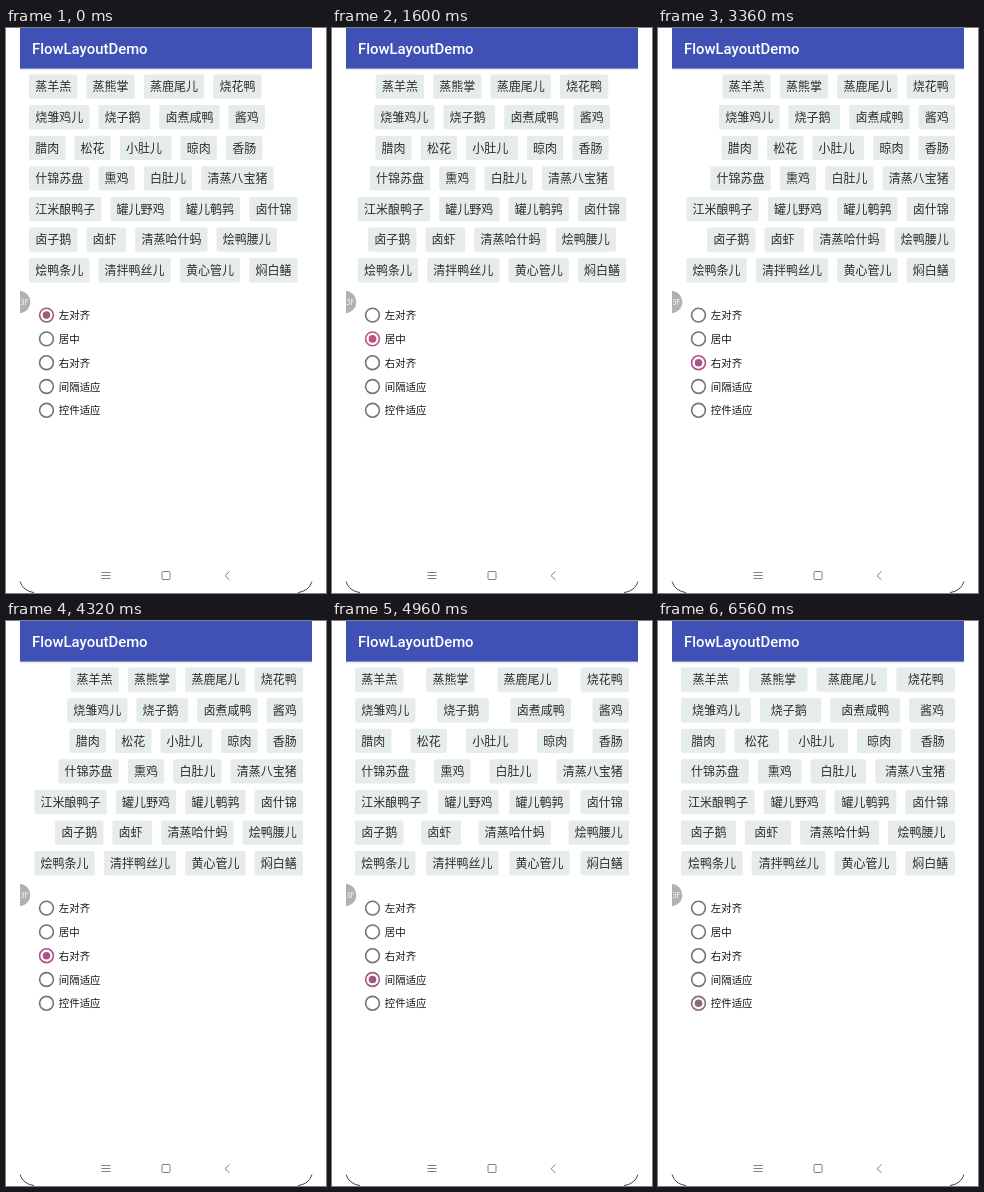
An HTML page for the animation above (7.04 s loop, 320x565 px).

```html
<!DOCTYPE html>
<html lang="zh-CN">
<head>
<meta charset="utf-8">
<title>FlowLayoutDemo</title>
<style>
  html, body { margin: 0; width: 100%; height: 100%; overflow: hidden; background: #fff; }
  svg { display: block; width: 100vw; height: 100vh; }
  text { font-family: "Noto Sans CJK SC", "Noto Sans CJK", sans-serif; white-space: pre; }
  .title { font: 500 14.9px Roboto, sans-serif; fill: #fff; }
  .chip rect { fill: #e6ecec; }
  .chip text { font-size: 12px; fill: #2a2d2d; }
  .option text { font-size: 10.45px; fill: #151515; }
  .ring { stroke-width: 1.6; }
  .nav { fill: none; stroke: #808080; stroke-width: 1; }
</style>
</head>
<body>
<svg id="stage" viewBox="0 0 320 565" preserveAspectRatio="none">
  <defs>
    <linearGradient id="shade" x2="0" y2="1">
      <stop offset="0" stop-color="#000" stop-opacity=".14"/>
      <stop offset="1" stop-color="#000" stop-opacity="0"/>
    </linearGradient>
    <clipPath id="screen"><rect x="14" width="292" height="565"/></clipPath>
  </defs>
  <rect width="320" height="565" fill="#fff"/>
  <rect x="14" y="40" width="292" height="3" fill="url(#shade)"/>
  <rect x="14" width="292" height="40.6" fill="#3f51b5"/>
  <text class="title" x="26" y="25.7">FlowLayoutDemo</text>
  <g id="chips"></g>
  <g id="options"></g>
  <g clip-path="url(#screen)">
    <circle cx="13" cy="274" r="11.3" fill="#b2b0b0"/>
    <text x="14.5" y="276.8" font-size="7" fill="#fff">3F</text>
  </g>
  <g class="nav">
    <path d="M95.5 544.5h9M95.5 547.5h9M95.5 550.5h9"/>
    <rect x="156" y="543.5" width="8" height="8" rx="1"/>
    <path d="M223.5 543.5l-4.5 4.2l4.5 4.2"/>
  </g>
  <path d="M14 553.500Q17 563 28 564.600M306 553.500Q303 563 292 564.600" fill="none" stroke="#333" stroke-width=".9"/>
</svg>
<script>
const LOOP = 7040;
const LEFT = 23, RIGHT = 297, GAP = 9;
const TOP = 46.5, PITCH = 30.6, HEIGHT = 24.3;
const GREY = '#747474', PRESSED = '#ececec';

const MENU = [
  '蒸羊羔|蒸熊掌|蒸鹿尾儿|烧花鸭',
  '烧雏鸡儿|烧子鹅 |卤煮咸鸭|酱鸡',
  '腊肉|松花|小肚儿 |晾肉|香肠',
  '什锦苏盘|熏鸡|白肚儿|清蒸八宝猪',
  '江米酿鸭子|罐儿野鸡|罐儿鹌鹑|卤什锦',
  '卤子鹅|卤虾 |清蒸哈什蚂|烩鸭腰儿',
  '烩鸭条儿|清拌鸭丝儿|黄心管儿|焖白鳝'
];
const OPTIONS = ['左对齐', '居中', '右对齐', '间隔适应', '控件适应'];
const ACCENTS = ['#9a5f76', '#c05080', '#b05088', '#a0587e', '#8a6b76'];

// time, selected option, size of its dot, size of the previous dot
const STEPS = [
  [0, 0, 1, 0],
  [1120, 1, 0, 1], [1280, 1, .5, .45], [1440, 1, 1, 0],
  [2880, 2, 0, 1], [3040, 2, .5, .45], [3200, 2, 1, 0],
  [4480, 3, 0, 1], [4640, 3, .5, .45], [4800, 3, 1, 0],
  [6080, 4, 0, 1], [6240, 4, .4, .5], [6400, 4, .8, .15], [6560, 4, 1, 0]
];

function add(parent, tag, attrs = {}, text = '') {
  const el = document.createElementNS('http://www.w3.org/2000/svg', tag);
  set(el, attrs);
  el.textContent = text;
  return parent.appendChild(el);
}

function set(el, attrs) {
  for (const key in attrs) el.setAttribute(key, attrs[key]);
}

const byId = id => document.getElementById(id);

const rows = MENU.map((line, r) => line.split('|').map(label => {
  const name = label.trim();
  const textWidth = name.length * 12 + (label === name ? 0 : 3.4);
  const y = TOP + r * PITCH;
  const g = add(byId('chips'), 'g', { class: 'chip' });
  return {
    textWidth,
    width: textWidth + 12.4,
    box: add(g, 'rect', { y, height: HEIGHT, rx: 1.8 }),
    text: add(g, 'text', { y: y + HEIGHT / 2 + 4.7 }, name)
  };
}));

const radios = OPTIONS.map((label, i) => {
  const cy = 287.1 + i * 23.8;
  const g = add(byId('options'), 'g', { class: 'option' });
  const ring = add(g, 'circle', { class: 'ring', cx: 40.5, cy, r: 6.9 });
  const dot = add(g, 'circle', { cx: 40.5, cy });
  add(g, 'text', { x: 52.8, y: cy + 4 }, label);
  return { ring, dot };
});

function layout(mode) {
  for (const row of rows) {
    const used = row.reduce((sum, chip) => sum + chip.width, GAP * (row.length - 1));
    const spare = RIGHT - LEFT - used;
    const gap = GAP + (mode === 3 ? spare / (row.length - 1) : 0);
    const grow = mode === 4 ? spare / row.length : 0;
    let x = LEFT + [0, spare / 2, spare, 0, 0][mode];
    for (const chip of row) {
      const width = chip.width + grow;
      set(chip.box, { x, width });
      set(chip.text, { x: x + (width - chip.textWidth) / 2 });
      x += width + gap;
    }
  }
}

function show([, selected, size, oldSize]) {
  layout(selected);
  radios.forEach(({ ring, dot }, i) => {
    const active = i === selected;
    const color = active ? ACCENTS[i] : GREY;
    const scale = active ? size : i === selected - 1 ? oldSize : 0;
    set(ring, { stroke: color, fill: active && !size ? PRESSED : 'none' });
    set(dot, { fill: color, r: 3.8 * scale });
  });
}

let current;
const start = performance.now();
function tick() {
  const t = (performance.now() - start) % LOOP;
  const step = STEPS.filter(s => s[0] <= t).pop();
  if (step !== current) show(current = step);
  requestAnimationFrame(tick);
}
tick();
</script>
</body>
</html>
```
